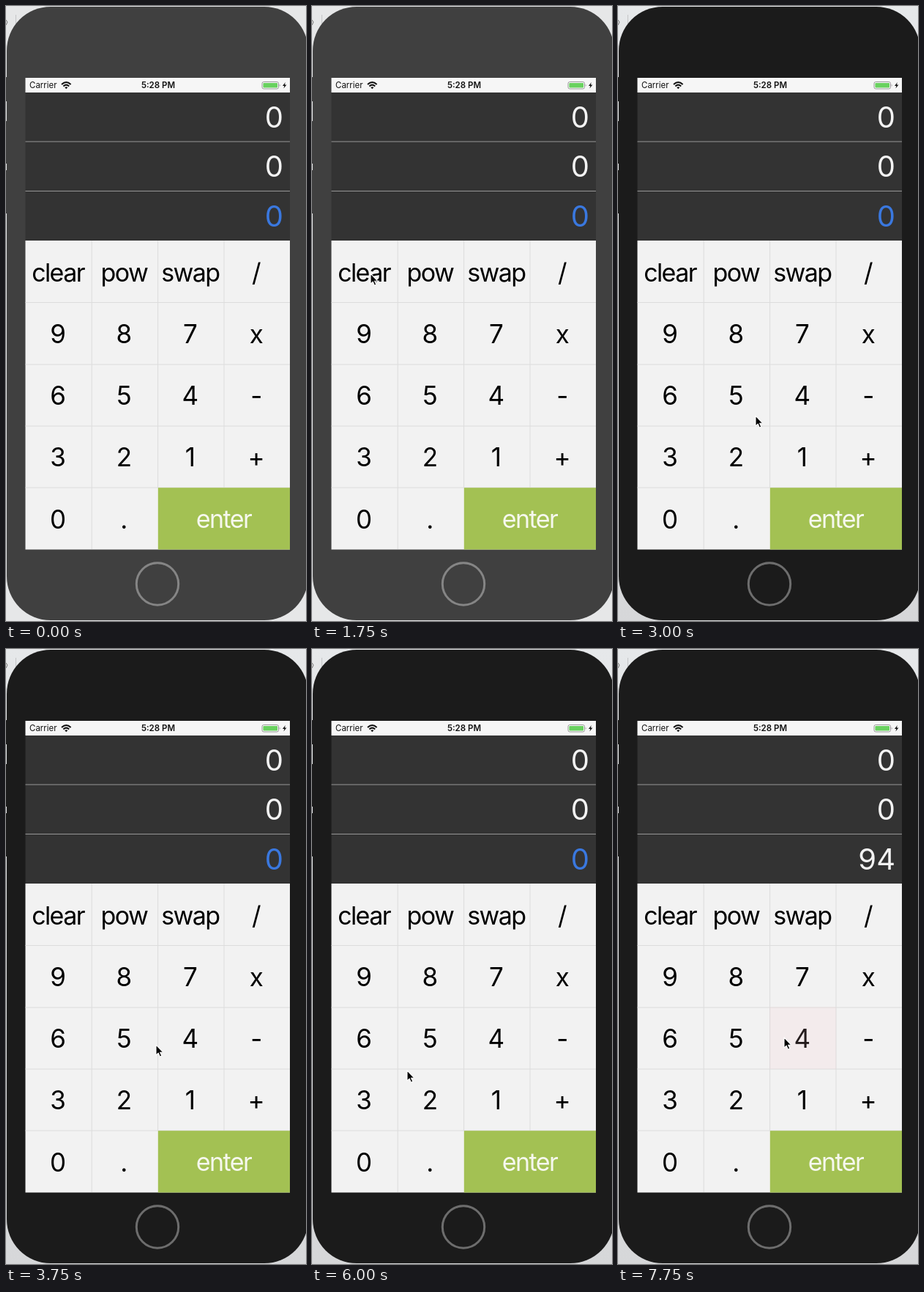
Animation of 410x839 px, one loop 8000 ms. Source, as an HTML page:

```html
<!DOCTYPE html>
<html lang="en">
<head>
<meta charset="utf-8">
<title>Stack calculator</title>
<style>
  html, body { margin: 0; width: 100%; height: 100%; overflow: hidden; background: #e4e5e7; }
  svg { display: block; width: 100vw; height: 100vh; }
  text { font-family: Inter, Roboto, sans-serif; }
  .key { font-size: 35px; text-anchor: middle; }
  .word { font-size: 34px; letter-spacing: -1.6px; }
  .value { font-size: 40px; text-anchor: end; fill: #f3f3f3; }
  .status { font-size: 11.5px; fill: #111; }
</style>
</head>
<body>
<svg viewBox="0 0 410 839" preserveAspectRatio="none">
  <defs>
    <linearGradient id="desk" x1="0" y1="0" x2="0" y2="1">
      <stop offset="0" stop-color="#e6e8ea"/>
      <stop offset="1" stop-color="#d6d7d9"/>
    </linearGradient>
  </defs>
  <rect width="410" height="839" fill="#e6e7e8"/>
  <rect id="activeDesk" width="410" height="839" fill="url(#desk)"/>
  <path d="M0 19L2 22M2 22L0 26" stroke="#777" fill="none"/>
  <path d="M13.5 12V31" stroke="#c4c5c7"/>
  <g id="body">
    <path d="M0 97H4V130H0ZM0 157H4V215H0ZM0 224H4V283H0Z"/>
    <rect x="1" y="1" width="412" height="837" rx="60"/>
  </g>
  <circle id="home" cx="207" cy="788.5" r="28.7" fill="none" stroke-width="3"/>

  <rect x="26.5" y="98" width="361.5" height="20" fill="#f6f6f6"/>
  <text class="status" x="32" y="112.3">Carrier</text>
  <text class="status" x="208" y="112.3" text-anchor="middle" font-weight="600">5:28 PM</text>
  <g fill="none" stroke="#111" stroke-width="2">
    <path d="M76 107Q82.3 101 88.6 107M78.4 109.4Q82.3 105.8 86.2 109.4"/>
    <path d="M80.2 111L82.3 113.3L84.4 111Q82.3 109.4 80.2 111Z" fill="#111" stroke="none"/>
  </g>
  <rect x="350" y="103.5" width="22.5" height="9.5" rx="2.3" fill="#fff" stroke="#8c8c8c" stroke-width=".9"/>
  <rect x="351.4" y="104.9" width="19.7" height="6.7" rx="1" fill="#69d15f"/>
  <path d="M373.8 106.5Q375.6 108.2 373.8 110Z" fill="#8c8c8c"/>
  <path d="M381.8 104L378 109H380.4L379.4 112.6L383.4 107.4H380.9Z" fill="#111"/>

  <rect x="26.5" y="118" width="361.5" height="202" fill="#333"/>
  <path d="M26.5 185H388M26.5 252.5H388" stroke="#969696"/>
  <text class="value" x="379" y="165.5">0</text>
  <text class="value" x="379" y="233">0</text>
  <text class="value" x="379" y="300.5" id="entry">0</text>

  <rect x="26.5" y="320" width="361.5" height="421.5" fill="#f2f2f2"/>
  <g id="keys"></g>
  <path d="M117.2 320V741M207.6 320V657M298 320V657M26.5 404.5H388M26.5 489H388M26.5 573H388M26.5 657H388" stroke="#dcdcdc" fill="none"/>
  <rect x="207.8" y="657.2" width="180.2" height="84.3" fill="#a3c153"/>
  <text class="key word" x="297.5" y="712" fill="#f6f8ee">enter</text>
  <rect id="flash" width="90.4" height="84.3" fill="#f9c0ca"/>
  <path id="pointer" d="M0 0V14.2L3.2 11.2L5.4 16.2L7.8 15.1L5.6 10.3H10Z" stroke="#fff" stroke-width="1.1" stroke-linejoin="round"/>
</svg>
<script>
const LOOP = 8000, STEP = 250;
const LEFT = 26.5, TOP = 320, CELL_W = 90.4, CELL_H = 84.3;
const $ = id => document.getElementById(id);
const set = (el, attrs) => Object.entries(attrs).forEach(([k, v]) => el.setAttribute(k, v));

const rows = ['clear pow swap /', '9 8 7 x', '6 5 4 -', '3 2 1 +', '0 .'];
rows.forEach((row, r) => row.split(' ').forEach((label, c) => {
  const text = document.createElementNS('http://www.w3.org/2000/svg', 'text');
  set(text, {
    class: label.length > 1 ? 'key word' : 'key',
    x: LEFT + CELL_W * (c + 0.5) - 0.7,
    y: TOP + CELL_H * r + 55.5
  });
  text.textContent = label;
  $('keys').append(text);
}));

// Pointer stops: time, x, y
const stops = [
  [500, 179, 293], [750, 181, 345], [1250, 120, 354], [1500, 80, 365],
  [2500, 92, 392], [2750, 160, 510], [3000, 188, 559], [3250, 223, 547], [3500, 205, 540],
  [4250, 114, 499], [4500, 140, 556], [4750, 182, 597], [5000, 207, 571], [5250, 200, 580],
  [5500, 194, 612], [5750, 172, 636], [6000, 130, 575], [6250, 84, 486], [6500, 66, 454],
  [7250, 178, 512], [7500, 227, 530]
];

// Each press tints a key, then the tint fades linearly.
const presses = [
  { at: 2000, col: 0, row: 0, tint: 0.77 },
  { at: 6750, col: 0, row: 1, tint: 0.52 },
  { at: 7500, col: 2, row: 2, tint: 0.77 }
];
const FADE_PER_MS = 0.0025;

function draw(now) {
  const t = Math.floor(now % LOOP / STEP) * STEP;
  const latest = (list, time) => list.filter(item => time(item) <= t).pop();

  const active = t >= 2000;
  set($('body'), { fill: active ? '#1b1b1b' : '#404040' });
  set($('home'), { stroke: active ? '#6d6d6d' : '#858585' });
  set($('activeDesk'), { opacity: active ? 1 : 0 });

  const entry = t < 6750 ? '0' : t < 7500 ? '9' : '94';
  $('entry').textContent = entry;
  $('entry').style.fill = entry === '0' ? '#3a78df' : '#f3f3f3';

  const press = latest(presses, p => p.at);
  if (press) set($('flash'), { x: LEFT + press.col * CELL_W, y: TOP + press.row * CELL_H });
  set($('flash'), { opacity: press ? Math.max(0, press.tint - (t - press.at) * FADE_PER_MS) : 0 });

  const stop = latest(stops, s => s[0]);
  set($('pointer'), stop
    ? { transform: `translate(${stop[1]} ${stop[2]})`, opacity: 1 }
    : { opacity: 0 });
}

const start = performance.now();
function tick() {
  draw(performance.now() - start);
  requestAnimationFrame(tick);
}
tick();
</script>
</body>
</html>
```
